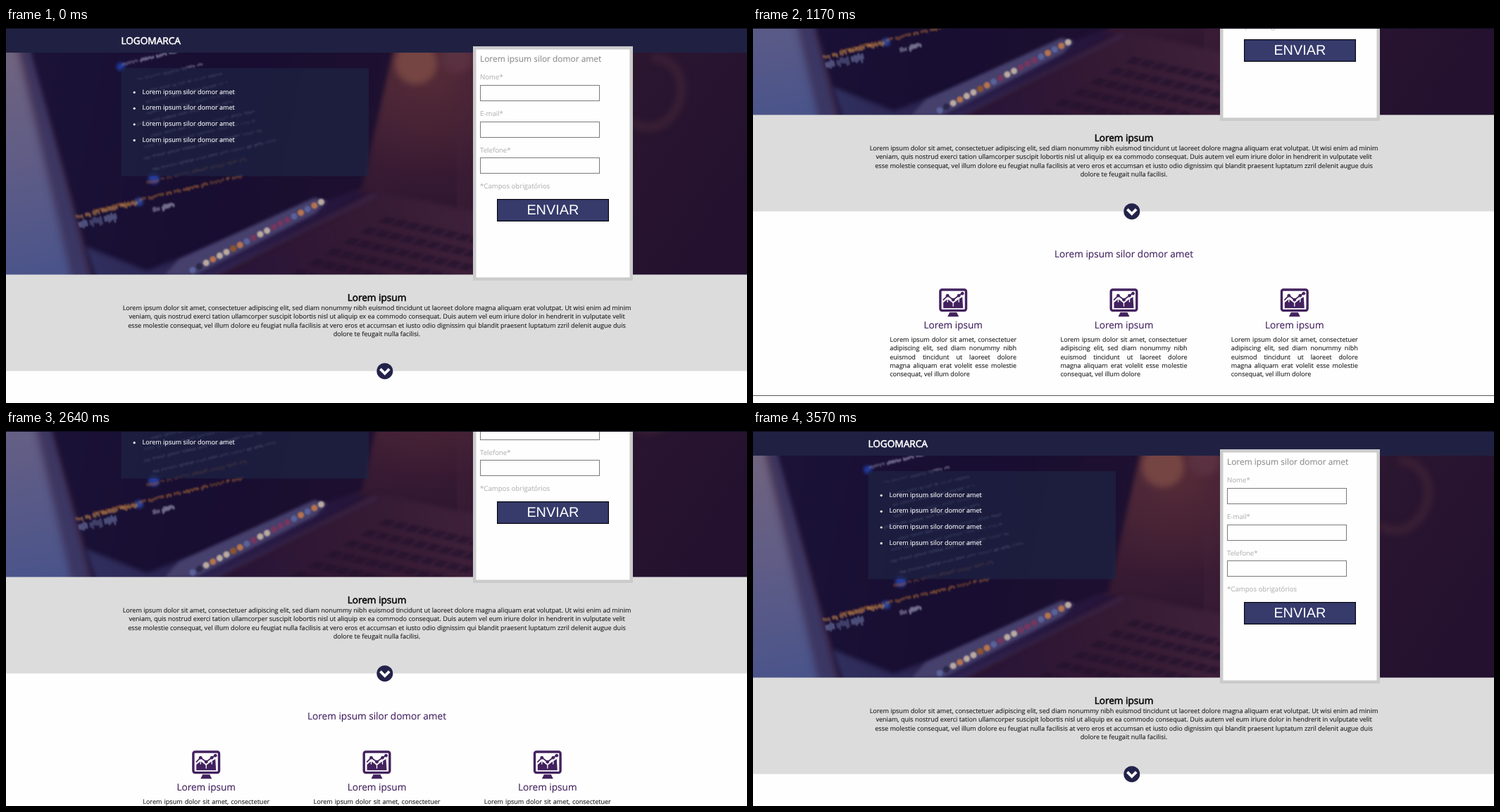
Write an HTML page with a canvas that moves like this. It is 1052 px wide and 533 px high and loops after 3.83 s.

```html
<!DOCTYPE html>
<html lang="pt">
<head>
<meta charset="utf-8">
<title>Landing page</title>
<style>
html, body { margin: 0; width: 100%; height: 100%; overflow: hidden; background: #fefefe; }
#stage { position: relative; width: 1052px; height: 533px; overflow: hidden; }
#stage::after { content: ""; position: absolute; left: 0; top: 0; width: 100%; height: 1px; background: #0c0c1c; }
#page { position: absolute; left: 0; top: 0; width: 1052px; height: 790px; }
canvas { position: absolute; left: 0; top: 0; }
.t, .card { position: absolute; font-family: "Open Sans", sans-serif; text-rendering: geometricPrecision; -webkit-text-stroke: 0.12px currentColor; }
.t { white-space: pre; line-height: 1.362; }
.mid { transform: translateX(-50%); }
.bold { -webkit-text-stroke-width: 0.6px; }
.button { font-family: "Liberation Sans", Arial, sans-serif; line-height: 1.149; -webkit-text-stroke-width: 0; }
.card { width: 180px; font-size: 9.07px; line-height: 12.36px; color: #1c1c1c; text-align: justify; }
u { color: #5a2a80; }
</style>
</head>
<body>
<div id="stage"><div id="page"><canvas id="art" width="1052" height="790"></canvas></div></div>
<script>
const page = document.getElementById("page");
const g = document.getElementById("art").getContext("2d");
const SCALE = 0.567, LOOP = 3830, NOTCH = 100, MAX_SCROLL = 452;
const DOWN = [500, 970, 1030, 1170, 1640], UP = [2560, 2640, 2780, 3040, 3040];
const PURPLE = "#43225f", WHITE = "#fefefe", MIDDLE = 526.5;
const CARDS = [-1, 0, 1].map(i => MIDDLE + i * 242.3);

let seed = 7;
const rand = () => (seed = (seed * 16807) % 2147483647) / 2147483647;
const pick = list => list[Math.floor(rand() * list.length)];

function rect(x, y, w, h, color) {
  g.fillStyle = color;
  g.fillRect(x, y, w, h);
}

function trace(points) {
  g.beginPath();
  for (const [x, y] of points) g.lineTo(x, y);
}

function poly(color, ...points) {
  g.fillStyle = color;
  trace(points);
  g.fill();
}

function line(color, width, ...points) {
  g.strokeStyle = color;
  g.lineWidth = width;
  trace(points);
  g.stroke();
}

function dot(x, y, r, color) {
  g.fillStyle = color;
  g.beginPath();
  g.arc(x, y, r, 0, 7);
  g.fill();
}

function glow(x, y, r, rgb, alpha) {
  const grad = g.createRadialGradient(x, y, 0, x, y, r);
  grad.addColorStop(0, `rgba(${rgb},${alpha})`);
  grad.addColorStop(1, `rgba(${rgb},0)`);
  rect(x - r, y - r, 2 * r, 2 * r, grad);
}

function ramp(x0, y0, x1, y1, ...colors) {
  const grad = g.createLinearGradient(x0, y0, x1, y1);
  colors.forEach((c, i) => grad.addColorStop(i / (colors.length - 1), c));
  return grad;
}

// A slanted row of blurred, word-like dashes
function codeRow(x, y, length, color, weight) {
  g.save();
  g.translate(x, y);
  g.rotate(-0.235);
  for (let p = 0; p < length; p += 3) {
    g.globalAlpha = 0.5 + rand() * 0.4;
    for (const end = Math.min(p + 4 + rand() * 20, length); p < end; p += 2.6)
      rect(p, -weight * (0.5 + rand() * 0.5), 1.8, weight * (0.7 + rand() * 0.6), color);
  }
  g.restore();
}

function keyboard() {
  for (let r = 0; r < 6; r++)
    for (let k = 0; k < 13; k++) {
      const x = 540 - r * 25 + k * 18, y = 268 + r * 15 + k * 4;
      poly("rgba(32,16,44,.6)", [x, y], [x + 14, y + 3], [x + 3, y + 11], [x - 11, y + 8]);
    }
}

function code() {
  codeRow(165, 53, 110, "#b0b0d0", 4);
  for (let i = 0; i < 9; i++)
    codeRow(185 + rand() * 25, 74 + i * 16, 95 + i * 11, pick(["#9a99b2", "#8d8ba4", "#7884a8"]), 3);
  codeRow(200, 221, 145, "#9b5e3c", 4);
  codeRow(125, 261, 215, "#b77037", 4);
  codeRow(100, 270, 90, "#d29350", 5);
  codeRow(104, 282, 55, "#8490c2", 10);
  codeRow(209, 260, 30, "#c4c4dc", 6);
}

function dock() {
  const tones = ["#b5734f", "#bbaaa0", "#5a629a", "#2a2748", "#8d552f", "#75365e"];
  for (let x = 265; x < 450; x += 9.6) dot(x, 344 - (x - 265) * 0.53, 4.6, pick(tones));
}

function photo() {
  g.save();
  g.beginPath();
  g.rect(0, 35, 1052, 316);
  g.clip();
  rect(0, 35, 1052, 316, ramp(480, 35, 600, 351, "#45243a", "#361a33", "#21112e"));
  rect(640, 35, 412, 316, ramp(640, 60, 1000, 300, "#3c1e38", "#2b1630", "#23112f"));
  glow(600, 60, 150, "110,58,58", 0.5);
  glow(660, 130, 240, "80,35,50", 0.25);

  g.filter = "blur(5px)";
  dot(582, 50, 30, "#754543");
  dot(640, 42, 22, "#5a3140");
  g.strokeStyle = "#3a2035";
  g.lineWidth = 12;
  g.beginPath();
  g.ellipse(916, 92, 42, 50, 0.3, -1.9, 1.9);
  g.stroke();

  // Wall, lid edge and screen
  g.filter = "blur(7px)";
  poly(ramp(0, 35, 60, 351, "#70647f", "#5f5c86", "#4a548a"), [-20, 10], [16, 10], [105, 370], [-20, 370]);
  poly("#3b3866", [18, 10], [34, 10], [126, 370], [98, 370]);
  g.filter = "blur(3px)";
  poly(ramp(40, 100, 540, 200, "#1b1238", "#180e31", "#1e1030"),
    [33, 25], [551, 25], [505, 228], [250, 362], [127, 362]);
  poly(ramp(110, 351, 500, 230, "#30305f", "#2a1e49", "#25143a"), [112, 310], [130, 362], [280, 362], [515, 235], [490, 232], [200, 345]);
  poly(ramp(300, 351, 660, 250, "#27143a", "#331933", "#3e203a"), [290, 365], [530, 232], [670, 262], [670, 365]);
  line("#403361", 2, [285, 356], [525, 237]);
  g.filter = "blur(1.5px)";
  keyboard();

  g.filter = "blur(2px)";
  poly("#46406c", [225, 351], [245, 329], [438, 241], [456, 246], [440, 263], [268, 351]);
  dot(163, 55, 6, "#20389a");
  dot(210, 214, 8, "#263b9a");
  dot(189, 247, 6, "#27439c");
  g.filter = "blur(1px)";
  code();
  dock();
  g.restore();
}

function monitor(cx) {
  const nodes = [[12, 10], [20, 16], [28, 10], [33, 7]];
  g.save();
  g.translate(cx - 20, 597.3);
  g.lineJoin = g.lineCap = "round";
  g.strokeStyle = PURPLE;
  g.lineWidth = 3.4;
  g.beginPath();
  g.roundRect(1.7, 1.7, 36.6, 29.6, 2.5);
  g.stroke();
  poly(PURPLE, [6, 28], [6, 20], ...nodes.map(([x, y]) => [x, y + 5]), [34, 28]);
  for (const [x, y] of nodes.slice(0, 3)) line(WHITE, 1.3, [x, y + 4], [x, y + 9]);
  line(PURPLE, 1.7, [6, 16], ...nodes);
  for (const [x, y] of nodes) dot(x, y, 2.4, PURPLE);
  poly(PURPLE, [15, 34], [25, 34], [28, 40], [12, 40]);
  g.restore();
}

function shapes() {
  photo();
  rect(0, 0, 1052, 35, "#202142");
  rect(163.5, 57, 351.5, 153.5, "rgba(30,36,68,.68)");
  for (let i = 0; i < 4; i++) dot(182.2, 91.6 + i * 22.7, 1.6, "#fff");

  rect(0, 350.5, 1052, 137.1, "#dcdcdc");
  rect(663, 26, 227, 333, "#cbcbcb");
  rect(667.5, 30.5, 218, 324, WHITE);
  g.strokeStyle = "#7a7a7a";
  g.lineWidth = 1;
  for (let i = 0; i < 3; i++) g.strokeRect(673.5, Math.floor(81.4 + i * 51.6) + 0.5, 169, 22);
  rect(697, 243, 159, 32, "#06060e");
  rect(698.2, 244.2, 156.6, 29.6, "#363b6c");

  dot(537.8, 487.7, 11.5, "#23224a");
  line(WHITE, 3.8, [531.4, 484.6], [537.8, 491], [544.2, 484.6]);
  CARDS.forEach(monitor);
  rect(0, 749, 1052, 1, "#58585c");
}

function text(html, x, baseline, size, color, cls = "", ascent = 1.069) {
  const el = document.createElement("div");
  el.className = "t " + cls;
  el.innerHTML = html;
  Object.assign(el.style, { left: x + "px", top: baseline - ascent * size + "px", fontSize: size + "px", color });
  page.append(el);
}

function card(cx) {
  text("Lorem ipsum", cx, 654.4, 24 * SCALE, PURPLE, "mid");
  const el = document.createElement("div");
  el.className = "card";
  el.style.left = cx - 90 + "px";
  el.style.top = "664px";
  el.textContent = "Lorem ipsum dolor sit amet, consectetuer adipiscing elit, sed diam nonummy nibh euismod tincidunt ut laoreet dolore magna aliquam erat volelit esse molestie consequat, vel illum dolore";
  page.append(el);
}

function texts() {
  const title = "Lorem ipsum silor domor amet", body = 16 * SCALE, head = 24 * SCALE;
  text("LOGOMARCA", 163.5, 24, head, "#fff", "bold");
  for (let i = 0; i < 4; i++) text(title, 193.5, 94.2 + i * 22.7, body, "#fff");

  text(title, 673, 48.8, 21 * SCALE, "#8c8c8c");
  ["Nome*", "E-mail*", "Telefone*", "*Campos obrigatórios"].forEach((s, i) =>
    text(s, 673, 73.8 + i * 51.6, 17 * SCALE, "#b5b5b5"));
  text("ENVIAR", 776.3, 266, 35 * SCALE, "#fff", "mid button", 0.905);

  text("Lorem ipsum", MIDDLE, 388.1, head, "#0a0a0a", "mid bold");
  ["Lorem ipsum dolor sit amet, consectetuer adipiscing elit, sed diam nonummy nibh euismod tincidunt ut laoreet dolore magna aliquam erat volutpat. Ut wisi enim ad minim",
   "veniam, quis nostrud exerci tation ullamcorper suscipit lobortis nisl ut aliquip ex ea commodo consequat. Duis autem vel eum iriure dolor in hendrerit in vulputate velit",
   "esse molestie consequat, vel illum dolore eu feugiat nulla facilisis at vero eros et accumsan et iusto odio dignissim qui blandit praesent luptatum zzril delenit augue duis",
   "dolore te feugait nulla facilisi."].forEach((s, i) => text(s, MIDDLE, 401.8 + i * 12.36, body, "#1c1c1c", "mid"));

  text(title, MIDDLE, 553.2, head, PURPLE, "mid");
  CARDS.forEach(card);
  text(".Copyright © 2022 | <u>Odânio Varleiro</u> - Repola.", MIDDLE, 775.6, body, "#777", "mid");
}

// Each wheel notch jumps the page, clamped at both ends
function scrollAt(t) {
  const turns = times => NOTCH * times.filter(at => at <= t).length;
  return Math.max(0, Math.min(turns(DOWN), MAX_SCROLL) - turns(UP));
}

function frame(now) {
  const y = Math.round(scrollAt(now % LOOP) * SCALE);
  page.style.transform = `translateY(${-y}px)`;
  requestAnimationFrame(frame);
}

shapes();
texts();
const start = performance.now();
requestAnimationFrame(now => frame(Math.max(0, now - start)));
</script>
</body>
</html>
```
